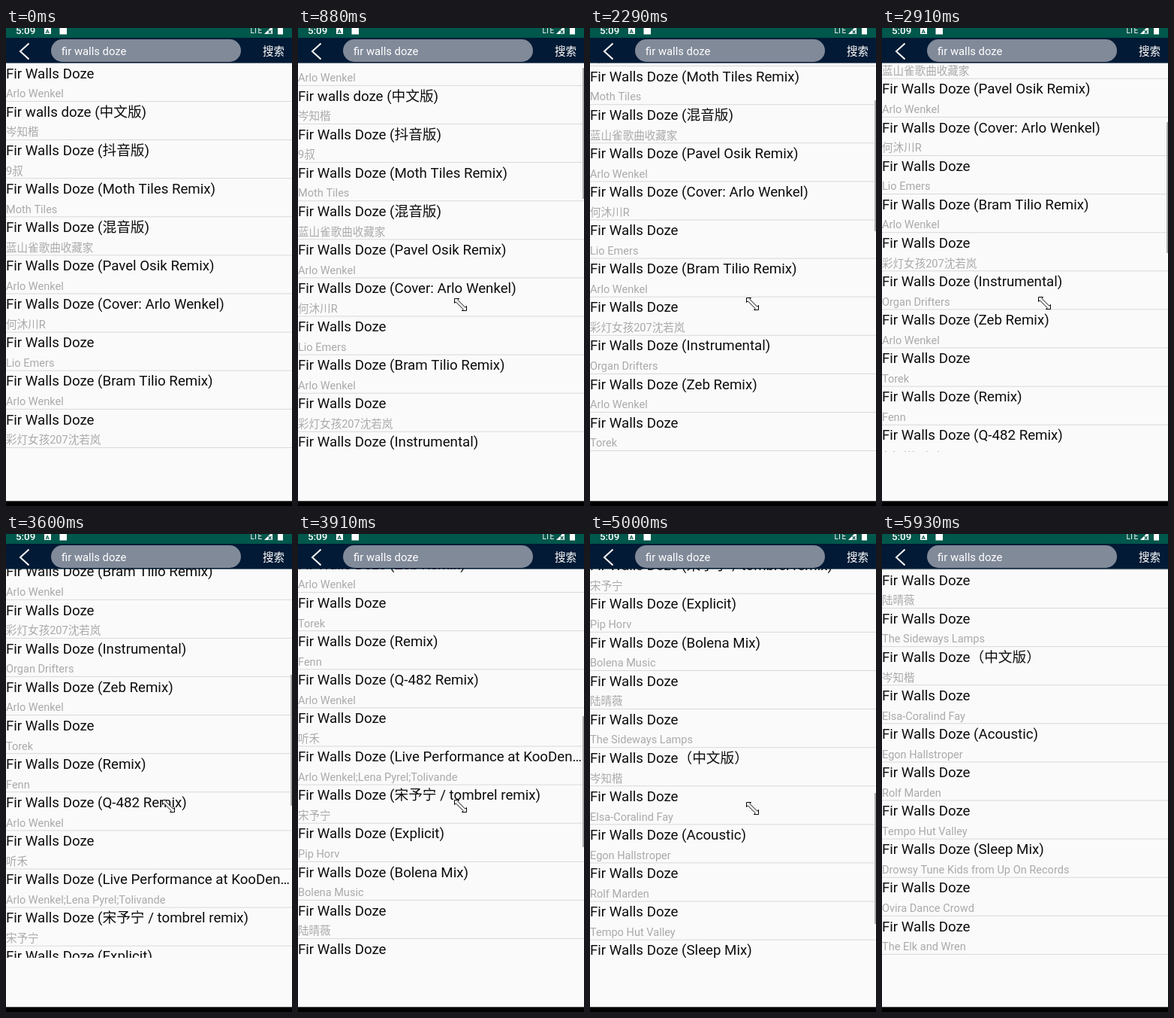
An HTML page with a canvas for the animation above (6.3 s loop, 381 by 635 pixels).

```html
<!DOCTYPE html>
<html lang="zh">
<head>
<meta charset="utf-8">
<title>Song search</title>
<style>
  html, body { margin: 0; width: 100%; height: 100%; overflow: hidden; background: #fafafa; }
  canvas { display: block; width: 381px; height: 635px; }
</style>
</head>
<body>
<canvas id="stage"></canvas>
<script>
const W = 381, H = 635, LOOP = 6300, STEP = 77;
const TOP = 46, BOTTOM = 563, VIEW = BOTTOM - TOP, ROW = 51.1, CONTENT = 1538;
const FONT = 'Roboto, "Noto Sans CJK SC", "Noto Sans CJK", sans-serif';
const SONG = 'Fir Walls Doze', STAR = 'Arlo Wenkel';

// [title suffix, artist]
const songs = [
  ['', STAR],
  [' (中文版)', '岑知楷'],
  [' (抖音版)', '9叔'],
  [' (Moth Tiles Remix)', 'Moth Tiles'],
  [' (混音版)', '蓝山雀歌曲收藏家'],
  [' (Pavel Osik Remix)', STAR],
  [' (Cover: ' + STAR + ')', '何沐川R'],
  ['', 'Lio Emers'],
  [' (Bram Tilio Remix)', STAR],
  ['', '彩灯女孩207沈若岚'],
  [' (Instrumental)', 'Organ Drifters'],
  [' (Zeb Remix)', STAR],
  ['', 'Torek'],
  [' (Remix)', 'Fenn'],
  [' (Q-482 Remix)', STAR],
  ['', '听禾'],
  [' (Live Performance at KooDen…', STAR + ';Lena Pyrel;Tolivande'],
  [' (宋予宁 / tombrel remix)', '宋予宁'],
  [' (Explicit)', 'Pip Horv'],
  [' (Bolena Mix)', 'Bolena Music'],
  ['', '陆晴薇'],
  ['', 'The Sideways Lamps'],
  ['（中文版）', '岑知楷'],
  ['', 'Elsa-Coralind Fay'],
  [' (Acoustic)', 'Egon Hallstroper'],
  ['', 'Rolf Marden'],
  ['', 'Tempo Hut Valley'],
  [' (Sleep Mix)', 'Drowsy Tune Kids from Up On Records'],
  ['', 'Ovira Dance Crowd'],
  ['', 'The Elk and Wren']
];

// Each scroll eases on to its offset; the pointer rests at y
const scrolls = [
  { first: 880, last: 1110, to: 64, power: 0.8, y: 367 },
  { first: 1660, last: 1820, to: 128, power: 1.1, y: 367 },
  { first: 2290, last: 2530, to: 192, power: 0.8, y: 366 },
  { first: 2910, last: 3050, to: 256, power: 0.37, y: 365 },
  { first: 3370, last: 3910, to: 582, power: 1, y: 361 },
  { first: 4060, last: 4460, to: 800, power: 0.54, y: 363 },
  { first: 4610, last: 5240, to: CONTENT - VIEW, power: 2.3, y: 364 }
];

const canvas = document.getElementById('stage');
const ctx = canvas.getContext('2d');
const dpr = window.devicePixelRatio || 1;
canvas.width = W * dpr;
canvas.height = H * dpr;

// Stepped progress from 0 to 1; the first step falls on `first`, 1 is reached on `last`
function progress(t, first, last) {
  if (t < first) return 0;
  const gaps = Math.round((last - first) / STEP);
  const done = Math.floor((t - first) / (last - first) * gaps + 0.06);
  return Math.min(1, (done + 1) / (gaps + 1));
}

function text(str, x, y, size, color, weight = 400) {
  ctx.font = `${weight} ${size}px ${FONT}`;
  ctx.fillStyle = color;
  ctx.fillText(str, x, y);
}

function rect(x, y, w, h, color) {
  ctx.fillStyle = color;
  ctx.fillRect(x, y, w, h);
}

function shape(points, close = true) {
  ctx.beginPath();
  points.forEach(([x, y]) => ctx.lineTo(x, y));
  if (close) ctx.closePath();
}

function scrollAt(t) {
  return scrolls.reduce((from, s) =>
    from + (s.to - from) * progress(t, s.first, s.last) ** s.power, 0);
}

function pointerAt(t) {
  const out = progress(t, 5300, 5460);
  if (out) return out < 1 ? [216.5 + 132 * out, 364.5 + 133 * out] : null;
  const rest = scrolls.filter(s => t >= s.first).pop();
  if (rest) return [216.5, rest.y + 0.5];
  const u = progress(t, 190, 730);
  const curve = (a, b, c) => a * (1 - u) ** 2 + 2 * b * u * (1 - u) + c * u * u;
  return u ? [curve(345, 140, 213), curve(686, 420, 376)] : null;
}

function drawList(offset) {
  ctx.save();
  ctx.beginPath();
  ctx.rect(0, TOP, W, VIEW);
  ctx.clip();
  songs.forEach(([suffix, artist], i) => {
    const y = TOP + i * ROW - offset;
    if (y < TOP - ROW || y > BOTTOM) return;
    const name = i === 1 ? 'Fir walls doze' : SONG;
    text(name + suffix, 0, Math.round(y + 20.6), 18.7, '#0c0c0c');
    text(artist, 0, Math.round(y + 46.3), 14.55, '#aaaaaa');
    rect(0, y + ROW - 0.1, W, 1, '#d9d9d9');
  });
  ctx.restore();
}

function drawBar(t, offset) {
  if (t < scrolls[0].first) return;
  const ratio = VIEW / CONTENT;
  ctx.globalAlpha = 1 - progress(t, 5780, 5930);
  rect(379, Math.round(TOP + offset * ratio), 2, Math.round(VIEW * ratio), '#adadad');
  ctx.globalAlpha = 1;
}

function drawHeader() {
  rect(0, 0, W, 14, '#00574b');
  rect(0, 13, W, 33.6, '#021a35');

  text('5:09', 13, 8, 13.3, '#fff', 500);
  rect(51, 0, 9, 8, '#fff');
  text('A', 52.6, 7, 8, '#00574b', 700);
  rect(71.5, 0, 9.5, 8.5, '#fff');
  text('LTE', 325.5, 7, 10, '#fff');
  ctx.fillStyle = '#fff';
  shape([[344, 8], [355, 8], [355, -3]]);
  ctx.fill();
  text('×', 349, 9, 10, '#00574b', 700);
  rect(362, 0, 7, 8.5, '#fff');

  ctx.strokeStyle = '#fff';
  ctx.lineWidth = 2;
  shape([[30.5, 20.5], [19, 31], [30.5, 41.5]], false);
  ctx.stroke();

  ctx.fillStyle = '#818a99';
  ctx.beginPath();
  ctx.roundRect(60, 15, 253, 30, 15);
  ctx.fill();
  text(SONG.toLowerCase(), 74, 35.5, 14.8, '#fff');
  text('搜索', 342, 36, 14.55, '#fff');
}

function drawPointer(pos) {
  if (!pos) return;
  const half = [[-8, -8], [-2, -8], [-3.7, -6.2], [6.2, 3.7], [8, 2]];
  const outline = half.concat(half.map(([x, y]) => [-x, -y]));
  ctx.save();
  ctx.translate(...pos);
  shape(outline);
  ctx.fillStyle = '#fff';
  ctx.fill();
  ctx.strokeStyle = '#000';
  ctx.lineWidth = 1;
  ctx.stroke();
  ctx.restore();
}

function draw(t) {
  const offset = scrollAt(t);
  ctx.setTransform(dpr, 0, 0, dpr, 0, 0);
  rect(0, 0, W, H, '#fafafa');
  drawList(offset);
  drawBar(t, offset);
  drawHeader();
  rect(0, 628.4, W, 7, '#000');
  drawPointer(pointerAt(t));
}

const start = performance.now();
function tick(now) {
  draw(Math.max(0, now - start) % LOOP);
  requestAnimationFrame(tick);
}
draw(0);
requestAnimationFrame(tick);
</script>
</body>
</html>
```
